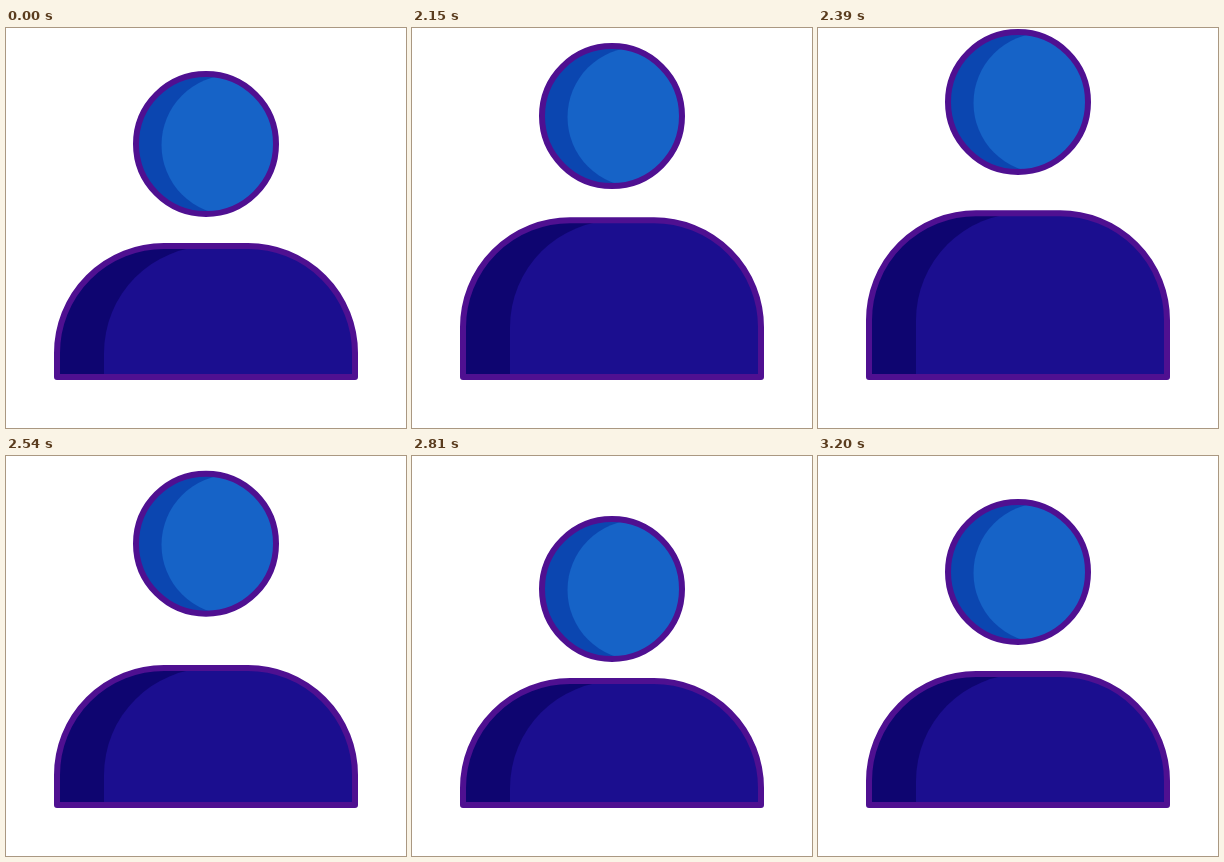
An HTML page with a canvas for the animation above (3.23 s loop, 400 by 400 pixels).

```html
<!DOCTYPE html>
<html lang="en">
<head>
<meta charset="utf-8">
<title>Person icon</title>
<style>
  html, body { margin: 0; width: 100%; height: 100%; overflow: hidden; background: #fff; }
  canvas { display: block; width: 100vmin; height: 100vmin; }
</style>
</head>
<body>
<canvas id="stage" width="400" height="400"></canvas>
<script>
const ctx = document.getElementById('stage').getContext('2d');
const LOOP = 3230, REST = 2000, STEP = 30;
const OUTLINE = '#4f1091';

// Cubic Bezier easing, solved for x by bisection.
function bezier(x1, y1, x2, y2) {
  const at = (s, a, b) => 3 * (1 - s) ** 2 * s * a + 3 * (1 - s) * s * s * b + s ** 3;
  return x => {
    let low = 0, high = 1;
    for (let i = 0; i < 24; i++) {
      const mid = (low + high) / 2;
      if (at(mid, x1, x2) < x) low = mid; else high = mid;
    }
    return at((low + high) / 2, y1, y2);
  };
}

const settle = bezier(0.72, 0, 0.3, 1);
// Each move: start step, end step, from, to, easing.
const headMoves = [
  [0, 13, 0, -42, bezier(0.36, 0, 0.13, 1)],
  [13, 26, -42, 17, bezier(0.73, 0, 0.15, 1)],
  [29, 40, 17, 0, settle]
];
const bodyMoves = [
  [0, 12, 0, -33, bezier(0.17, 0.3, 0.25, 1)],
  [12, 25, -33, 7, bezier(0.75, 0, 0.05, 1)],
  [29, 40, 7, 0, settle]
];

function offset(moves, step) {
  let value = 0;
  for (const [start, end, from, to, ease] of moves) {
    if (step <= start) break;
    value = step >= end ? to : from + (to - from) * ease((step - start) / (end - start));
  }
  return value;
}

function circle(x, y) {
  const path = new Path2D();
  path.arc(x, y, 70, 0, Math.PI * 2);
  return path;
}

function shoulders(left, top) {
  const right = left + 298, bottom = 349, radius = 107;
  const path = new Path2D();
  path.moveTo(left, bottom);
  path.arcTo(left, top, left + radius, top, radius);
  path.arcTo(right, top, right, top + radius, radius);
  path.lineTo(right, bottom);
  path.closePath();
  return path;
}

function drawShaded(shape, lit, shade, light) {
  ctx.save();
  ctx.clip(shape);
  ctx.fillStyle = shade;
  ctx.fill(shape);
  ctx.fillStyle = light;
  ctx.fill(lit);
  ctx.restore();
  ctx.strokeStyle = OUTLINE;
  ctx.stroke(shape);
}

function draw(time) {
  const step = Math.max(0, Math.floor((time % LOOP - REST) / STEP));
  const headY = 116 + offset(headMoves, step);
  const bodyTop = 218 + offset(bodyMoves, step);

  ctx.fillStyle = '#fff';
  ctx.fillRect(0, 0, 400, 400);
  ctx.lineWidth = 6;
  ctx.lineJoin = 'round';
  drawShaded(shoulders(51, bodyTop), shoulders(98, bodyTop), '#0e0570', '#1b0e8f');
  drawShaded(circle(200, headY), circle(225.5, headY + 1), '#0b46b0', '#1663c7');
}

const begin = performance.now();
function tick() {
  draw(performance.now() - begin);
  requestAnimationFrame(tick);
}
tick();
</script>
</body>
</html>
```
